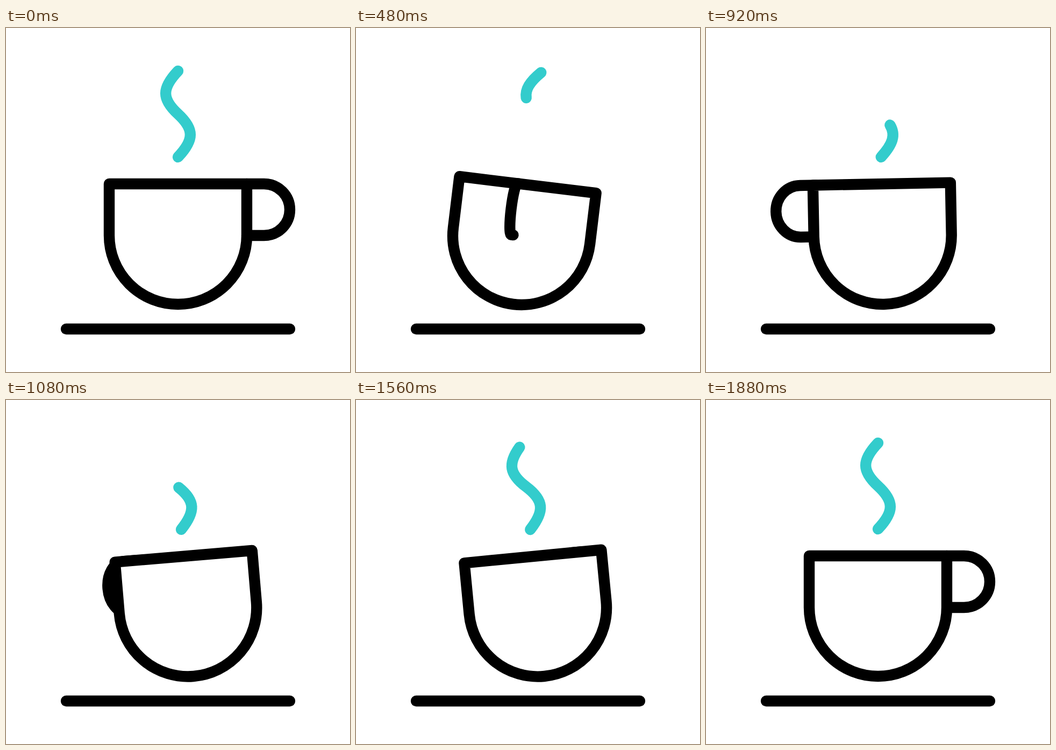
Write an HTML page that moves like this. It is 640 px wide and 640 px high and loops after 2000 ms.

```html
<!DOCTYPE html>
<html lang="en">
<head>
<meta charset="utf-8">
<title>Coffee cup</title>
<style>
  html, body { margin: 0; height: 100%; overflow: hidden; background: #fff; }
  svg { display: block; width: 100vw; height: 100vh; }
  path { fill: none; stroke: #000; stroke-width: 20.4; stroke-linecap: round; stroke-linejoin: round; }
  #body { fill: #fff; }
  #steam path { stroke: #3cc; }
</style>
</head>
<body>
<svg viewBox="0 0 640 640">
  <g id="steam">
    <path id="fade" pathLength="1" d="M320 80C289.5 112 289.5 132 320 160C350.5 188 350.5 208 320 240"/>
    <path id="rise" pathLength="1" d="M320 240C350.5 208 350.5 188 320 160C289.5 132 289.5 112 320 80"/>
  </g>
  <path d="M112 560H528"/>
  <g id="cup">
    <path id="back"/>
    <path id="body" d="M-128-96H128V0A128 128 0 0 1-128 0Z"/>
    <path id="front"/>
  </g>
</svg>
<script>
const LOOP = 2000, STEP = 40;
const el = id => document.getElementById(id);
const [steam, fade, rise, cup, back, front] =
  ['steam', 'fade', 'rise', 'cup', 'back', 'front'].map(el);

const linear = u => u;
const smooth = u => u * u * (3 - 2 * u);

// Value at time t along [time, value] keys
function track(t, keys, ease = smooth) {
  if (t <= keys[0][0]) return keys[0][1];
  for (let i = 1; i < keys.length; i++) {
    const [t0, a] = keys[i - 1], [t1, b] = keys[i];
    if (t < t1) return a + (b - a) * ease((t - t0) / (t1 - t0));
  }
  return keys[keys.length - 1][1];
}

const sway = (t, left, right) => track(t, [[80, 0], [440, left], [1360, right], [1880, 0]]);

// Horizontal foreshortening of the handle as it circles the cup
function turn(t) {
  if (t >= 880) return track(t, [[820, -1], [1880, 1]]);
  const angle = 97 * Math.max(0, (t - 80) / 400) ** 0.85;
  return Math.cos(angle * Math.PI / 180);
}

function handle(c) {
  const near = 128 * c, far = 160 * c;
  return `M${near} -96H${far}A${48 * Math.abs(c)} 48 0 0 ${c > 0 ? 1 : 0} ${far} 0H${near}`;
}

function trim(path, part) {
  path.style.display = part > 0 ? '' : 'none';
  path.setAttribute('stroke-dasharray', part < 1 ? `${part} 2` : 'none');
}

function draw(t) {
  const tilt = sway(t, 7, -8.2);
  const drop = 128 * (1 - Math.cos(tilt * Math.PI / 180));
  cup.setAttribute('transform', `translate(${320 + sway(t, -12.2, 27)} ${386 + drop}) rotate(${tilt})`);

  const inFront = t < 880, shape = handle(turn(t));
  front.setAttribute('d', inFront ? shape : '');
  back.setAttribute('d', inFront ? '' : shape);

  steam.setAttribute('transform',
    `translate(${sway(t, 5, 6.3)} ${0.035 * tilt * tilt}) rotate(${tilt} 320 240)`);
  trim(fade, t < 680 ? track(t, [[80, 1], [710, 0]]) : 0);
  trim(rise, track(t, [[500, 0], [720, 0.19], [1080, 0.487], [1400, 0.81], [1600, 1]], linear));
}

function tick() {
  const t = (performance.now() + 1) % LOOP;
  draw(Math.floor(t / STEP) * STEP);
  requestAnimationFrame(tick);
}
tick();
</script>
</body>
</html>
```
